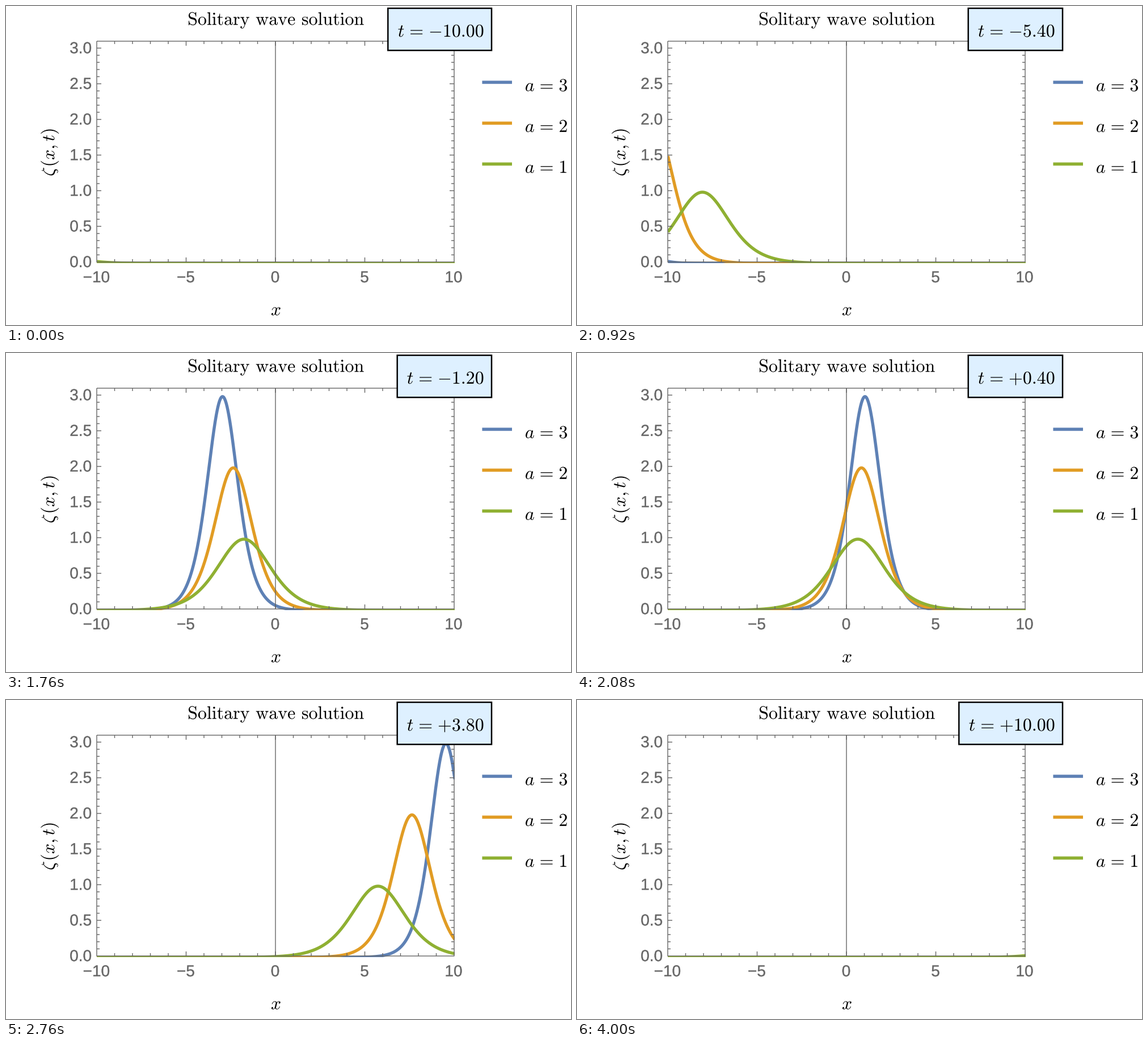
These frames come from a looping animation (996x562 px, 4040 ms). A matplotlib script:

```python
import numpy as np
import matplotlib.pyplot as plt
from matplotlib.animation import FuncAnimation
from matplotlib.collections import LineCollection
from matplotlib.patches import PathPatch, Rectangle
from matplotlib.path import Path
from matplotlib.textpath import TextPath
from matplotlib.transforms import Affine2D

W, H, DPI = 996, 562, 64
PX = 72 / DPI  # points per pixel
FRAMES, INTERVAL = 101, 40

LEFT, RIGHT, TOP, BOTTOM = 160, 790, 62, 451
X_UNIT, Y_UNIT = 31.5, 125.6
X_ZERO = (LEFT + RIGHT) / 2
GRAY = "#666666"
WAVES = [(3, "#5E81B5"), (2, "#E19C24"), (1, "#8FB032")]

plt.rcParams["mathtext.fontset"] = "cm"
fig = plt.figure(figsize=(W / DPI, H / DPI), dpi=DPI, facecolor="white")
ax = fig.add_axes([0, 0, 1, 1])
ax.set_xlim(0, W)
ax.set_ylim(H, 0)
ax.axis("off")


def text_path(s, x, y, size, align="center", angle=0, family="DejaVu Sans"):
    """Outline of s with its baseline at y, aligned by its inked extent."""
    glyphs = TextPath((0, 0), s, size=size, prop={"family": family})
    path = Path(glyphs.vertices, glyphs.codes)
    box = path.get_extents()
    anchor = {"left": box.x0, "center": (box.x0 + box.x1) / 2, "right": box.x1}[align]
    place = Affine2D().translate(-anchor, 0).scale(1, -1).rotate_deg(-angle).translate(x, y)
    return path.transformed(place)


def draw_text(*args, color="black", weight=0.0, zorder=5, **kw):
    patch = PathPatch(text_path(*args, **kw), fc=color, ec=color if weight else "none",
                      lw=weight * PX, zorder=zorder, snap=False)
    return ax.add_patch(patch)


def equation(name, value):
    return rf"${name}\hspace{{0.117}}=\hspace{{0.117}}{value}$"


def clock_path(t):
    sign = "-" if t < 0 else "+"
    text = equation("t", f"{{{sign}}}{abs(t):.2f}")
    return text_path(text, 841.4, 54.2, 32, align="right")


def frame_lines():
    corners = [(LEFT, TOP), (RIGHT, TOP), (RIGHT, BOTTOM), (LEFT, BOTTOM), (LEFT, TOP)]
    lines = [corners, [(X_ZERO, TOP), (X_ZERO, BOTTOM)]]
    for n in range(-9, 10):
        x = X_ZERO + n * X_UNIT
        size = 8 if n % 5 == 0 else 5
        lines += [[(x, BOTTOM), (x, BOTTOM - size)], [(x, TOP), (x, TOP + size)]]
    for n in range(1, 31):
        y = BOTTOM - n * Y_UNIT / 10
        size = 8 if n % 5 == 0 else 5
        lines += [[(LEFT, y), (LEFT + size, y)], [(RIGHT, y), (RIGHT - size, y)]]
    return lines


# Frame, ticks and the vertical axis
ax.add_collection(LineCollection(frame_lines(), colors=GRAY, linewidths=1.4 * PX,
                                 zorder=3, snap=False))

tick_style = dict(color=GRAY, weight=0.4, family="Liberation Sans")
for n in range(-10, 11, 5):
    draw_text(str(n).replace("-", "\u2212"), X_ZERO - 0.5 + n * X_UNIT, 486.8, 28, **tick_style)
for n in range(7):
    draw_text(f"{n / 2:.1f}", 150, BOTTOM + 9 - n * Y_UNIT / 2, 28, align="right", **tick_style)

# Titles
space = r"\hspace{0.38}"
draw_text(rf"$\mathrm{{Solitary{space}wave{space}solution}}$", 476.3, 33.4, 32)
draw_text("$x$", 475.8, 545, 32)
draw_text(r"$\zeta\hspace{0.085}(x,t)$", 85.2, 258, 32, angle=90)

# Curves and legend
xs = np.linspace(-10.03, 10, 900)
clip = Rectangle((160, 55), 631, 398, transform=ax.transData)
curves = []
for i, (a, color) in enumerate(WAVES):
    line, = ax.plot([], [], color=color, lw=5.4 * PX, solid_capstyle="butt",
                    solid_joinstyle="round", zorder=2)
    line.set_clip_path(clip)
    curves.append(line)
    y = 134.4 + 72 * i
    ax.plot([839.4, 892], [y, y], color=color, lw=5.6 * PX, solid_capstyle="butt", snap=False)
    draw_text(equation("a", a), 916, y + 15.6, 32, align="left")

# Clock
BOX_TOP, BOX_BOTTOM, BOX_RIGHT = 4, 78.2, 856
clock_box = ax.add_patch(Rectangle((0, BOX_TOP), 1, BOX_BOTTOM - BOX_TOP, fc="#DEF0FF",
                                   ec="black", lw=2.5 * PX, joinstyle="miter",
                                   zorder=6, snap=False))
clock = ax.add_patch(PathPatch(clock_path(-10), fc="black", ec="none", zorder=7, snap=False))


def soliton(a, t):
    return a / np.cosh(np.sqrt(a) / 2 * (xs - (1 + a / 2) * t)) ** 2


def update(i):
    t = (i - 50) / 5
    for (a, _), line in zip(WAVES, curves):
        line.set_data(476.2 + xs * X_UNIT, 453.6 - soliton(a, t) * Y_UNIT)
    left = 673.3 if abs(t) >= 10 else 689.7
    clock_box.set_x(left)
    clock_box.set_width(BOX_RIGHT - left)
    clock.set_path(clock_path(t))
    return [*curves, clock_box, clock]


anim = FuncAnimation(fig, update, frames=FRAMES, interval=INTERVAL, repeat=True,
                     repeat_delay=0, blit=False)
plt.show()
```
